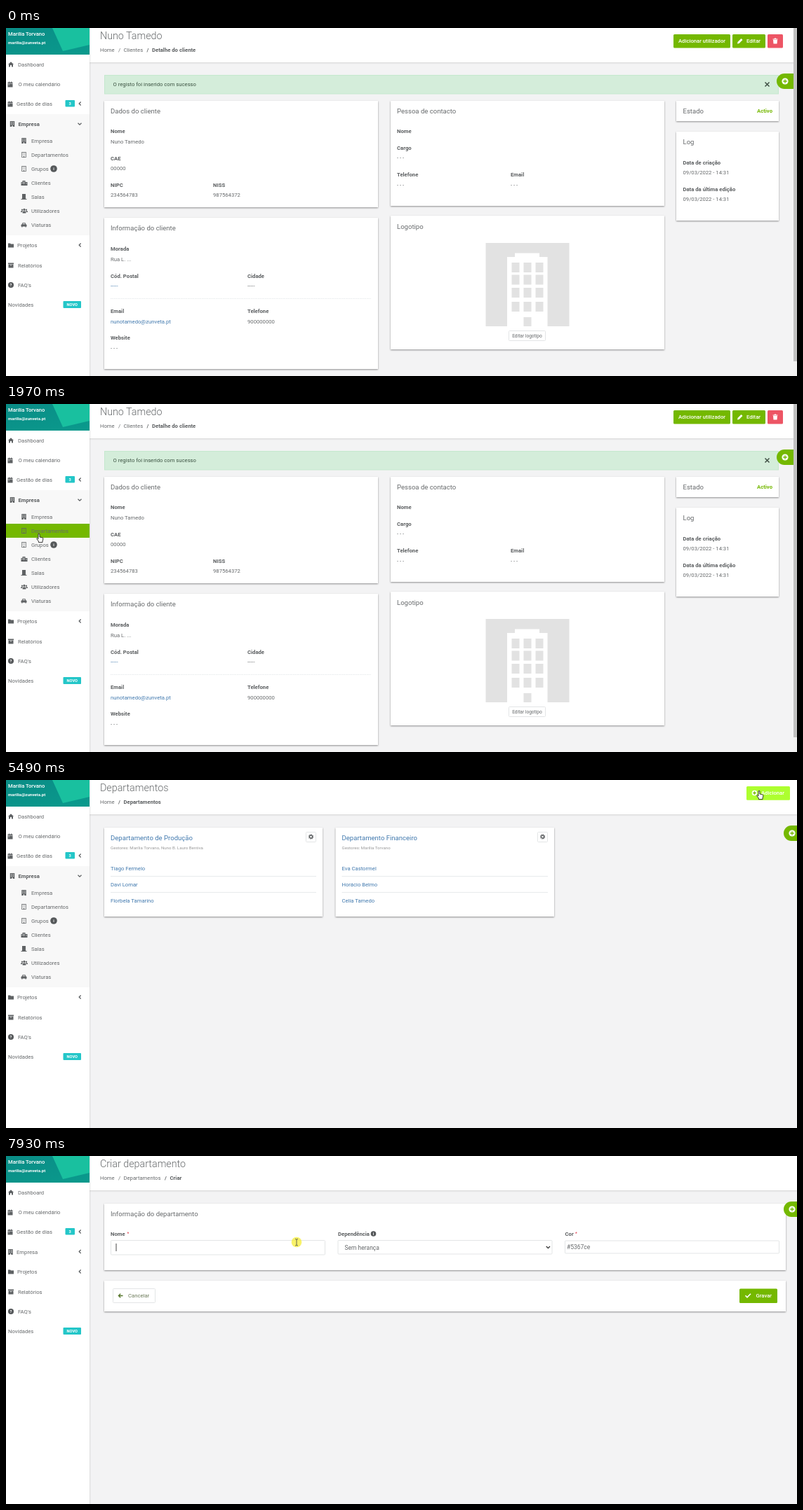
Recreate the animation shown at these times as an HTML page. Size 1127 by 497 pixels, loop 8 s.

```html
<!DOCTYPE html>
<html lang="pt">
<head>
<meta charset="utf-8">
<title>Departamentos</title>
<style>
html, body { margin: 0; width: 100%; height: 100%; overflow: hidden; background: #f3f3f4 }
svg { display: block; width: 1127px; height: 497px }
text { font: 7.7px Roboto, sans-serif; fill: #676a6c; dominant-baseline: central; white-space: pre }
.b { font-weight: 700; fill: #5b5e60 }
.h { font-size: 14.3px; font-weight: 300 }
.c { font-size: 9.55px }
.l { fill: #4179ae }
.w { font-weight: 500; fill: #fff }
.s { font-size: 6.1px; fill: #999 }
.f { font-size: 8.5px }
.tag { font-size: 5.7px; font-weight: 700; fill: #fff }
.m { text-anchor: middle }
.e { text-anchor: end }
.g { fill: #74b800 }
.card { fill: #fff; filter: drop-shadow(0 1px .8px rgba(0,0,0,.42)) }
.box { fill: #fff; stroke: #e3e5e6 }
.ic { fill: #5f6264; fill-rule: evenodd }
.ln { fill: none; stroke: #5f6264; stroke-width: 1.3 }
</style>
</head>
<body>
<svg id="stage" viewBox="0 0 1127 497"></svg>
<script>
const GREEN = '#74b800';
const ICONS = {
  home: 'M0 4L4 .3 8 4H7V7.5H5V5H3V7.5H1V4Z',
  cal: 'M0 1H1.5V0H2.5V1H4.5V0H5.5V1H7V2.5H0ZM0 3H7V8H0ZM1.2 4V5H2.2V4Z',
  bld: 'M.8 0H7.2V8H4.7V6.3H3.3V8H.8ZM2 1.2V2.3H3.4V1.2ZM4.6 1.2V2.3H6V1.2ZM2 3.6V4.7H3.4V3.6ZM4.6 3.6V4.7H6V3.6Z',
  frame: 'M.8 0H7.2V8H.8ZM1.5 .7V7.3H3.4V6H4.6V7.3H6.5V.7ZM2.4 1.6H3.4V2.6H2.4ZM4.6 1.6H5.6V2.6H4.6ZM2.4 3.7H3.4V4.7H2.4ZM4.6 3.7H5.6V4.7H4.6Z',
  city: 'M0 3H2V1H6V3H9V8H0ZM1 4V5H2V4ZM3 2.5V3.5H5V2.5ZM3 4.5V5.5H5V4.5ZM7 4.5V5.5H8V4.5Z',
  door: 'M1.5 0H6.5V7H8V8H0V7H1.5Z',
  users: 'M5 .8A1.6 1.6 0 1 1 4.9 .8ZM2 1.6A1.1 1.1 0 1 1 1.9 1.6ZM8 1.6A1.1 1.1 0 1 1 7.9 1.6ZM2.6 7.4V5.8L3.8 4.5H6.2L7.4 5.8V7.4ZM0 6V4.9L1 4.2H3L2 6ZM10 6V4.9L9 4.2H7L8 6Z',
  car: 'M0 4L1 3.4 2 1.3H6L7 3.4 8 4V6.4H7.2V7.4H6V6.4H2V7.4H.8V6.4H0ZM2.1 3.3H5.9L5.4 2.2H2.6Z',
  folder: 'M0 1H3L4 2H8V7H0Z',
  box: 'M0 .5H8V2.2H0ZM.5 2.8H7.5V7.5H.5ZM3 3.6V4.3H5V3.6Z',
  trash: 'M0 1H2L2.5 0H4.5L5 1H7V2H0ZM.5 2.6H6.5L6 8H1Z',
  pencil: 'M0 8L.5 5.5 5.5 .5 7.5 2.5 2.5 7.5Z'
};

const text = (x, y, s, cls = '') => `<text x="${x}" y="${y}" class="${cls}">${s}</text>`;
const rect = (x, y, x2, y2, attrs) => `<rect x="${x}" y="${y}" width="${x2 - x}" height="${y2 - y}" ${attrs}/>`;
const fill = (x, y, x2, y2, color, r = 0) => rect(x, y, x2, y2, `fill="${color}" rx="${r}"`);
const card = (...r) => rect(...r, 'class="card"');
const box = (...r) => rect(...r, 'class="box" rx="1"');
const path = (d, attrs) => `<path d="${d}" ${attrs}/>`;
const line = (d, attrs = '') => path(d, `class="ln" ${attrs}`);
const circle = (x, y, r, color) => `<circle cx="${x}" cy="${y}" r="${r}" fill="${color}"/>`;
const group = (id, ...parts) => `<g id="${id}">${parts.join('')}</g>`;
const icon = (name, x, y, attrs = '') =>
  `<g transform="translate(${x - 4} ${y - 4})">${path(ICONS[name], 'class="ic" ' + attrs)}</g>`;
const mark = (x, y, s, r = 4) => circle(x, y, r, '#55585a') + text(x, y + .2, s, 'tag m');
const white = 'style="fill:#fff"';
const plus = (x, y, r, color = GREEN) =>
  circle(x, y, r, '#fff') + line(`M${x - r * .6} ${y}h${r * 1.2}M${x} ${y - r * .6}v${r * 1.2}`, `style="stroke:${color}"`);
const tag = (x, y, x2, y2, s) => fill(x, y, x2, y2, '#23c6c8', 1) + text((x + x2) / 2, (y + y2) / 2, s, 'tag m');
const chevron = y => line(`M106.6 ${y - 2.5}l-2.4 2.5 2.4 2.5`);
const addTab = (x, edge) =>
  path(`M${edge} 65H${x + 11}a11 11 0 0 0 0 22H${edge}Z`, `fill="${GREEN}"`) + plus(x + 12, 76, 4.6);
const field = (x, y, label, value, cls) => text(x, y, label, 'b') + text(x, y + 14.6, value, cls);
const heading = (title, ...crumbs) => text(134, 11, title, 'h') + crumbs.map(([x, s], i) => {
  const last = i === crumbs.length - 1 ? 'b' : '';
  return (i ? text(x - 7.5, 31, '/', last) : '') + text(x, 31, s, last);
}).join('');

const gradient = `<linearGradient id="teal" x2=".8" y2="1"><stop stop-color="#0a8c86"/>
  <stop offset="1" stop-color="#0a998c"/></linearGradient>`;

const subItems = [['bld', 'Empresa'], ['frame', 'Departamentos'], ['frame', 'Grupos'], ['city', 'Clientes'],
  ['door', 'Salas'], ['users', 'Utilizadores'], ['car', 'Viaturas']];

const sidebar = group('side',
  fill(0, 0, 119, 497, '#fff'),
  icon('home', 7, 52), text(17, 52, 'Dashboard'),
  icon('cal', 6.5, 80.5), text(17.5, 80.5, 'O meu calendário'),
  icon('cal', 6.5, 108.5), text(15, 108.5, 'Gestão de dias'), tag(84.5, 103, 98, 112.5, '3'), chevron(108),
  group('opened',
    fill(0, 123, 119, 297, '#f8f8f8'),
    rect(0, 123, 119, 151, 'id="hover" class="g"'),
    icon('bld', 9, 137), text(17.5, 137, 'Empresa', 'b'), line('M102.5 135.8l2.5 2.4 2.5-2.4'),
    ...subItems.map(([name, s], i) => {
      const y = 161 + i * 20;
      return icon(name, name === 'users' ? 25 : 25.5, y) + text(36, y, s);
    }),
    mark(68, 201, 'i', 4.8)),
  group('closed', fill(0, 123, 119, 151, '#fff'), icon('bld', 6.5, 137), text(15, 137, 'Empresa'), chevron(136.5)),
  group('lower',
    fill(0, 151, 119, 497, '#fff'),
    icon('folder', 7, 165.5), text(16, 165.5, 'Projetos'), chevron(165),
    icon('box', 7, 194), text(17, 194, 'Relatórios'),
    mark(7, 222, '?'), text(17, 222, "FAQ's"),
    text(3, 250.5, 'Novidades'), tag(81.5, 245, 107, 255, 'NOVO')),
  group('profile',
    fill(0, 0, 119, 38, 'url(#teal)'),
    path('M66 0H119V24L81 33Z', 'fill="#19c09f"'),
    text(3, 8, 'Marília Torvano', 'w b" style="fill:#fff;font-size:7.6px'),
    text(3, 20.5, 'marilia@zunveta.pt', 'tag" style="font-size:6.1px')));

const windows = [335, 352.5, 371, 391].flatMap(y => [720.5, 737.5, 754.5].map(x => fill(x, y, x + 11, y + 14, '#e2e2e2')));

const client = group('client',
  heading('Nuno Tamedo', [134, 'Home'], [167.5, 'Clientes'], [208, 'Detalhe do cliente']),
  fill(951, 9, 1032, 28.5, GREEN, 1.5), text(991.5, 18.7, 'Adicionar utilizador', 'w m'),
  fill(1035, 9, 1082, 28.5, GREEN, 1.5), icon('pencil', 1046, 18.5, white), text(1055, 18.7, 'Editar', 'w'),
  fill(1085, 9, 1107, 28.5, '#ed5565', 1.5), icon('trash', 1096.5, 18.5, white),
  rect(140.5, 67.5, 1100.5, 94, 'fill="#d4edda" stroke="#c5e8ce"'),
  text(152.5, 80.7, 'O registo foi inserido com sucesso', '" style="fill:#3d5443'),
  line('M1081.5 77.5l6 6m0-6l-6 6', 'style="stroke:#405046;stroke-width:1.5"'),
  card(140, 104, 530, 256), text(149, 118, 'Dados do cliente', 'c'),
  field(149, 147.5, 'Nome', 'Nuno Tamedo'), field(149, 186, 'CAE', '00000'),
  field(149, 224, 'NIPC', '234564783'), field(295, 224, 'NISS', '987564372'),
  card(140, 271, 530, 487), text(149, 285.7, 'Informação do cliente', 'c'),
  field(149, 315.5, 'Morada', 'Rua L. ...'),
  field(149, 354, 'Cód. Postal', '-----', 'l'), field(344, 354, 'Cidade', '-----'),
  path('M149 386.5H520', 'stroke="#e7eaec" stroke-dasharray="1.5 1"'),
  field(149, 404.5, 'Email', 'nunotamedo@zunveta.pt', 'l'), field(344, 404.5, 'Telefone', '900000000'),
  field(149, 442.5, 'Website', '- - -'),
  card(548, 104, 938, 254), text(557, 118, 'Pessoa de contacto', 'c'),
  text(557, 147.5, 'Nome', 'b'), field(557, 171, 'Cargo', '- - -'),
  field(557, 209.5, 'Telefone', '- - -'), field(719, 209.5, 'Email', '- - -'),
  card(548, 268, 938, 459), text(557, 283.5, 'Logotipo', 'c'),
  fill(683.5, 307, 802.5, 426, '#e2e2e2'),
  path('M714 426V327H725V321.5H760V327H771.5V426Z', 'fill="#fff"'), ...windows,
  fill(737.5, 413, 748.5, 426, '#e2e2e2'),
  box(716.5, 432.5, 768.5, 446.5), text(742.5, 439.5, 'Editar logotipo', 'm" style="font-size:6.6px'),
  card(955, 104, 1101, 133), text(964.5, 118, 'Estado', 'c'), text(1092, 118.3, 'Activo', 'b e" style="fill:' + GREEN),
  card(955, 148, 1101, 275), text(964.5, 162, 'Log', 'c'),
  field(964.5, 192, 'Data de criação', '09/03/2022 - 14:31'),
  field(964.5, 230, 'Data da última edição', '09/03/2022 - 14:31'),
  addTab(1098, 1122),
  fill(1122, 0, 1127, 497, '#f1f1f1'), fill(1122, 0, 1127, 476, '#c1c1c1'));

const department = (x, x2, name, managers, people) =>
  card(x, 68, x2, 195) + text(x + 9, 82, name, 'c l') + text(x + 9, 96.5, 'Gestores: ' + managers, 's') +
  box(x2 - 23.5, 74.5, x2 - 9.5, 88.5) +
  `<circle cx="${x2 - 16.5}" cy="81" r="2" class="ln"/><circle cx="${x2 - 16.5}" cy="81" r="3" class="ln" stroke-dasharray="1.2 1.156"/>` +
  people.map((s, i) => text(x + 9, 126.7 + i * 23, s, 'l') +
    (i ? path(`M${x + 9} ${114.5 + i * 23}H${x2 - 9}`, 'stroke="#e7eaec"') : '')).join('');

const list = group('list',
  heading('Departamentos', [134, 'Home'], [167.5, 'Departamentos']),
  rect(1055, 9, 1117, 28.8, 'id="add" rx="1.5"'), plus(1066.5, 18.5, 3.8), text(1076, 18.7, 'Adicionar', 'w'),
  department(140, 451, 'Departamento de Produção', 'Marília Torvano, Nuno B. Lauro Bentiva',
    ['Tiago Fermelo', 'Davi Lomar', 'Florbela Tamarino']),
  department(469.5, 781, 'Departamento Financeiro', 'Marília Torvano', ['Eva Castormel', 'Horácio Belmo', 'Celia Tamedo']),
  addTab(1108, 1127));

const star = x => text(x, 110.5, '*', '" style="fill:#e0404f;font-size:6.5px');
const form = group('form',
  heading('Criar departamento', [134, 'Home'], [167.5, 'Departamentos'], [233.5, 'Criar']),
  card(140, 68, 1111, 163), text(149, 82, 'Informação do departamento', 'c'),
  text(149, 111, 'Nome', 'b'), star(172.5), box(149.5, 120.5, 454.5, 141),
  text(473, 111, 'Dependência', 'b'), mark(523.5, 111, 'i', 3.8), box(473, 120.5, 778, 140),
  text(482.5, 130.5, 'Sem herança', 'f'), line('M769.8 129l2.6 2.6 2.6-2.6', 'style="stroke:#333"'),
  text(796.5, 111, 'Cor', 'b'), star(811), box(796.5, 121, 1101.5, 139), text(799, 129.7, '#5367ce', 'f'),
  group('actions',
    card(140, 178, 1111, 222),
    box(152.5, 189.5, 212.5, 209.5), line('M166.5 199.5h-6m2.7-2.8l-2.8 2.8 2.8 2.8', 'style="stroke:#55752a"'),
    text(174, 199.5, 'Cancelar', '" style="fill:#6b7a58'),
    fill(1045, 189.5, 1099, 210, GREEN, 1.5), line('M1053.5 199.3l2.5 2.5 5-5', 'style="stroke:#fff;stroke-width:1.6"'),
    text(1068.5, 199.7, 'Gravar', 'w'),
    addTab(1108, 1127)),
  path('M157 125V136', 'id="caret" stroke="#333" stroke-width=".9"'));

const outline = 'fill="#fff" stroke="#222" stroke-width=".9" stroke-linejoin="round"';
const cursor = group('cursor',
  group('click', '<circle r="7.3" fill="#f4ec22" opacity=".68"/>'),
  path('M0 0V9.2L2.2 7.3 3.7 10.6 5.1 10 3.7 6.8H6.6Z', `id="arrow" ${outline}`),
  path('M-1 1Q0-.4 1 1V5L5.2 6Q6 6.3 5.8 8L5 11V12.6H-.6V11L-3.2 7.6Q-3.2 6.2 -2.2 6.6L-1 7.8Z', `id="hand" ${outline}`),
  path('M-2-4.5Q0-4.5 0-3.5Q0-4.5 2-4.5M0-3.5V4M-2 5Q0 5 0 4Q0 5 2 5', 'id="beam" fill="none" stroke="#444" stroke-width=".8"'));

stage.innerHTML = gradient +
  fill(0, 0, 1127, 497, '#f3f3f4') +
  rect(119, -5, 1127, 49, 'fill="#fff" style="filter:drop-shadow(0 1px 1px rgba(0,0,0,.13))"') +
  client + list + form +
  `<g style="filter:drop-shadow(.5px 0 .8px rgba(0,0,0,.25))">${sidebar}</g>` +
  rect(0, 0, 1127, 497, 'id="blank" fill="#fff"') + cursor;

const $ = id => document.getElementById(id);
const show = (id, on) => { $(id).style.display = on ? '' : 'none'; };

// start, end, steps, from, to, height of the curve's control point
const MOVES = [
  [200, 990, 11, [999, 449], [11, 139]],
  [1280, 1970, 10, [11, 139], [47, 185]],
  [3470, 3770, 5, [47, 185], [252, 150]],
  [4170, 4630, 7, [252, 150], [685, 123]],
  [4780, 5490, 10, [685, 123], [1073, 15]],
  [7060, 7850, 11, [1073, 15], [414, 123], 165]
];

function progress(t, start, end, steps) {
  if (t < start) return 0;
  const k = Math.min(steps, Math.floor((t - start) / (end - start) * (steps - 1) + 1e-6) + 1) / steps;
  return k * k * (3 - 2 * k);
}

function pointer(t) {
  const [a, b, n, p, q, cy = (p[1] + q[1]) / 2] = MOVES.findLast(m => t >= m[0]) || MOVES[0];
  const k = progress(t, a, b, n), j = 1 - k;
  return [p[0] * j + q[0] * k, p[1] * j * j + 2 * cy * j * k + q[1] * k * k];
}

function draw(t) {
  const within = (a, b) => t >= a && t < b;
  const [x, y] = pointer(t);

  show('client', t < 2930);
  show('list', within(3470, 6510));
  show('form', t >= 6690);
  show('actions', t >= 6900);
  show('caret', t >= 7930);
  show('blank', within(6510, 6600));
  show('profile', !within(2930, 3000));

  const open = t < 2930 ? 1 : t < 6510 ? progress(t, 3470, 3770, 5) : 0;
  show('closed', !open);
  $('lower').setAttribute('transform', `translate(0 ${Math.round(145 * open)})`);

  const onRow = t < 2930 && x < 119 && y >= 123 && y < 191;
  const top = y < 151 ? 123 : y < 171 ? 151 : 171;
  show('hover', onRow);
  $('hover').setAttribute('y', top);
  $('hover').setAttribute('height', top === 123 ? 28 : 20);

  const onAdd = within(3470, 6510) && x >= 1055 && y <= 28;
  $('add').setAttribute('fill', !onAdd ? GREEN : within(6040, 6210) ? '#9be81f' : '#adff2f');

  const beam = t > 7400 && x < 455 && y > 119;
  show('cursor', t >= 200);
  show('hand', onRow || onAdd);
  show('beam', beam);
  show('arrow', !onRow && !onAdd && !beam);
  show('click', within(2290, 2380) || within(6040, 6210) || t >= 7930);
  $('cursor').setAttribute('transform', `translate(${x} ${y})`);
}

const began = performance.now();
(function tick() {
  draw((performance.now() - began) % 8000);
  requestAnimationFrame(tick);
})();
</script>
</body>
</html>
```
